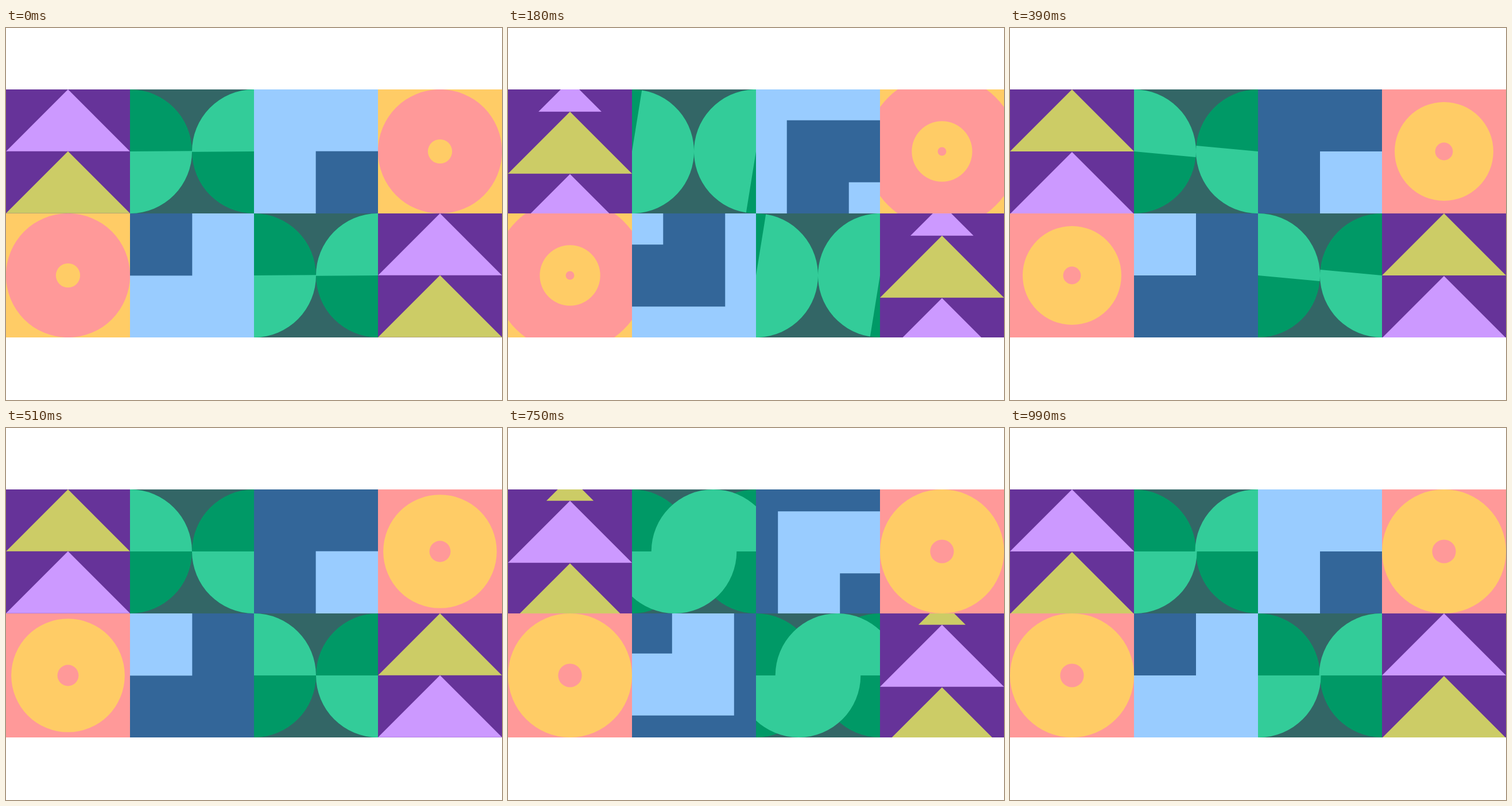
Recreate the animation shown at these times as an HTML page with a canvas. Size 864 by 648 pixels, loop 1.02 s.

```html
<!DOCTYPE html>
<html lang="en">
<head>
<meta charset="utf-8">
<title>Pattern tiles</title>
<style>
  html, body { margin: 0; width: 100%; height: 100%; overflow: hidden; background: #fff; }
  canvas { display: block; width: 864px; height: 648px; }
</style>
</head>
<body>
<canvas id="stage" width="864" height="648"></canvas>
<script>
const ctx = document.getElementById('stage').getContext('2d');
const LOOP = 1020, HALF = LOOP / 2;
const S = 216, R = S / 2, TOP = 107;
const PURPLE = '#663399', LILAC = '#cc99ff', LIME = '#cccc66';
const TEAL = '#336666', GREEN = '#009966', MINT = '#33cc99';
const SKY = '#99ccff', BLUE = '#336699';
const YELLOW = '#ffcc66', PINK = '#ff9999';

const clamp = v => Math.max(0, Math.min(1, v));

function bezier(x1, y1, x2, y2) {
  const at = (u, a, b) => 3 * u * (1 - u) ** 2 * a + 3 * u * u * (1 - u) * b + u ** 3;
  return x => {
    let lo = 0, hi = 1;
    for (let i = 0; i < 24; i++) {
      const mid = (lo + hi) / 2;
      if (at(mid, x1, x2) < x) lo = mid; else hi = mid;
    }
    return at(hi, y1, y2);
  };
}

const scrollEase = bezier(.167, .167, .667, 1);
const slideEase = bezier(.44, 0, .23, 1);
const growEase = bezier(.167, .167, .54, 1);

function rect(x, y, w, h, color) {
  ctx.fillStyle = color;
  ctx.fillRect(x, y, w, h);
}

function disc(x, y, r, color, from = 0, to = 2 * Math.PI) {
  ctx.fillStyle = color;
  ctx.beginPath();
  ctx.arc(x, y, r, from, to);
  ctx.fill();
}

// Upward triangle, half as tall as it is wide.
function triangle(apex, h, color) {
  ctx.fillStyle = color;
  ctx.beginPath();
  ctx.moveTo(R, apex);
  ctx.lineTo(R + h, apex + h);
  ctx.lineTo(R - h, apex + h);
  ctx.fill();
}

function arrows(t) {
  const second = t >= HALF;
  const p = scrollEase(clamp((t % HALF) / 360));
  const [a, b] = second ? [LIME, LILAC] : [LILAC, LIME];
  const h = R * (1 - .8 * p + .05 * p * p);
  rect(0, 0, S, S, PURPLE);
  triangle(R * (1 - p) - h, h, a);
  triangle(R * (1 - p), R, b);
  if (p > 0) triangle(S - 107 * p, R, a);
}

function leaves(t) {
  rect(0, 0, S, S, TEAL);
  disc(0, R, R, GREEN);
  disc(S, R, R, GREEN);
  if (t < HALF) {
    const turn = -Math.PI * clamp(t / 403);
    disc(0, R, R, MINT, turn, turn + Math.PI);
    disc(S, R, R, MINT, turn + Math.PI, turn + 2 * Math.PI);
  } else {
    const x = S * slideEase(clamp((t - HALF) / 540));
    disc(x, R, R, MINT, Math.PI, 2 * Math.PI);
    disc(S - x, R, R, MINT, 0, Math.PI);
  }
}

function squares(t) {
  const second = t >= HALF;
  const d = R * clamp((t % HALF) / (second ? 378 : 368)) ** .97;
  const [a, b] = second ? [BLUE, SKY] : [SKY, BLUE];
  const corner = (side, color) => rect(S - side, S - side, side, side, color);
  corner(S, a);
  corner(R + d, b);
  corner(d, a);
}

function ring(t) {
  const p = growEase(clamp(t / 720));
  rect(0, 0, S, S, YELLOW);
  disc(R, R, R + 68 * p, PINK);
  disc(R, R, 21 + 87 * p, YELLOW);
  disc(R, R, 20.6 * p, PINK);
}

function tile(col, row, paint, t, flip) {
  ctx.save();
  ctx.translate(col * S, TOP + row * S);
  if (flip) {
    ctx.translate(S, S);
    ctx.rotate(Math.PI);
  }
  ctx.beginPath();
  ctx.rect(0, 0, S, S);
  ctx.clip();
  paint(t);
  ctx.restore();
}

function draw(t) {
  rect(0, 0, 864, 648, '#fff');
  [arrows, leaves, squares, ring].forEach((paint, i) => tile(i, 0, paint, t));
  [ring, squares, leaves, arrows].forEach((paint, i) => tile(i, 1, paint, t, paint === squares));
}

const start = performance.now();
function loop() {
  draw((performance.now() - start) % LOOP);
  requestAnimationFrame(loop);
}
loop();
</script>
</body>
</html>
```
